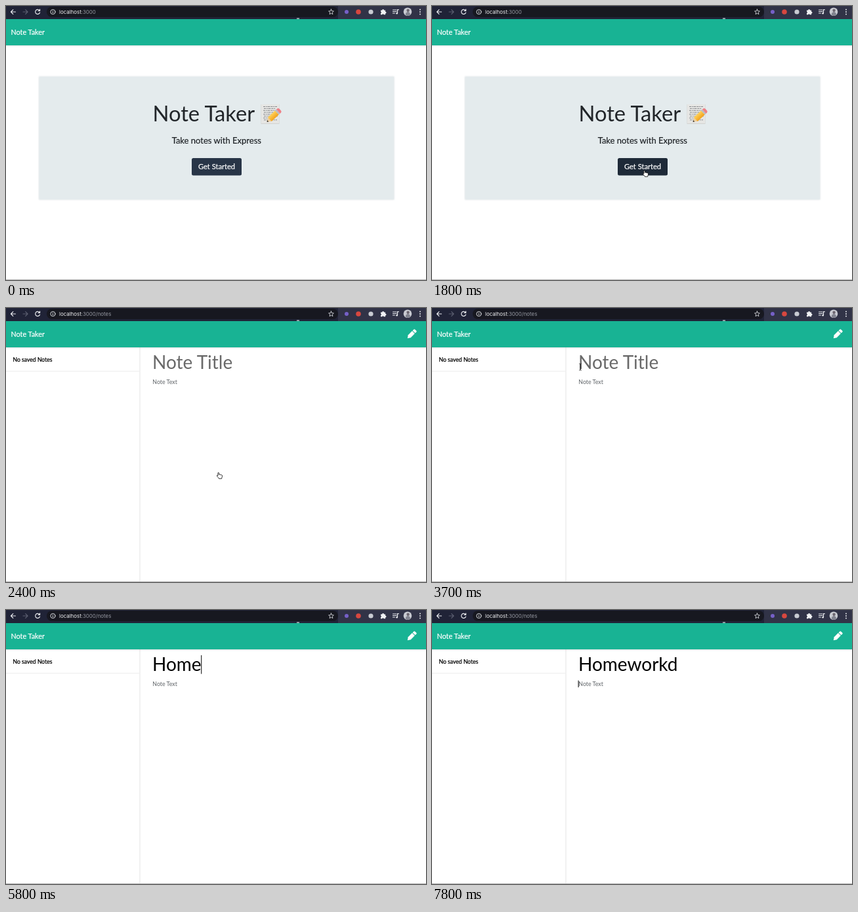
An HTML page that plays this animation: 640x418 px, repeating every 8000 ms.

```html
<!DOCTYPE html>
<html lang="en">
<head>
<meta charset="utf-8">
<title>Note Taker</title>
<style>
html, body { margin: 0; width: 100%; height: 100%; overflow: hidden; background: #fff; }
svg { display: block; width: 640px; height: 418px; }
text { font-family: Lato, sans-serif; white-space: pre; stroke-width: .22px; }
.url { font-family: Inter, Roboto, sans-serif; font-size: 7.9px; }
.line { fill: none; stroke: #e8eaee; stroke-width: 1.2; stroke-linecap: round; stroke-linejoin: round; }
</style>
</head>
<body>
<svg viewBox="0 0 640 418" xmlns="http://www.w3.org/2000/svg">
  <defs>
    <filter id="soft" x="-5%" y="-10%" width="110%" height="125%"><feGaussianBlur stdDeviation="1.2"/></filter>
    <linearGradient id="lead" x2="0" y2="1">
      <stop offset="0" stop-color="#ffd25c"/><stop offset="1" stop-color="#f2a21b"/>
    </linearGradient>
  </defs>
  <rect width="640" height="418" fill="#fff"/>

  <g id="home">
    <rect x="50" y="107.5" width="541.5" height="188" fill="#cfd8db" opacity=".7" filter="url(#soft)"/>
    <rect x="51" y="108" width="540" height="187" fill="#e4ebed"/>
    <text x="223.5" y="176" font-size="32.7" fill="#212529">Note Taker</text>
    <g id="memo" transform="translate(388 149)">
      <rect x=".5" y="1" width="28" height="30" fill="#d2d2d0"/>
      <rect x="1" y="1" width="27" height="29" fill="#e6e6e4"/>
      <path id="scrawl" fill="none" stroke="#85878a" stroke-width="1" stroke-dasharray="3 .9 1.7 .8 4 1"/>
      <g transform="translate(9.5 28) rotate(-43)">
        <path d="M0 0L6.5-4.2V4.2Z" fill="#efcf9c"/>
        <path d="M0 0L2.4-1.5V1.5Z" fill="#333"/>
        <rect x="6" y="-4.2" width="15" height="8.4" fill="url(#lead)"/>
        <rect x="21" y="-4.2" width="2.6" height="8.4" fill="#b9bdc2"/>
        <path d="M23.6-4.2h1.6a2.4 2.4 0 0 1 2.4 2.4v3.6a2.4 2.4 0 0 1-2.4 2.4h-1.6z" fill="#ee7f86"/>
      </g>
    </g>
    <text x="252.7" y="210" font-size="13" fill="#212529" stroke="#212529">Take notes with Express</text>
    <rect id="btn" x="283" y="232" width="76" height="26.5" rx="2.5" stroke-width="3.4" paint-order="stroke"/>
    <text x="293" y="249" font-size="11.1" fill="#fff" stroke="#fff">Get Started</text>
  </g>

  <g id="notes">
    <path d="M0 96.5H204" stroke="#f1f1f1" stroke-width="1.6"/>
    <path d="M204 60V417" stroke="#f0f0f0" stroke-width="1.8"/>
    <text x="10.5" y="82" font-size="8.65" fill="#000" stroke="#000">No saved Notes</text>
    <text id="title" x="223" y="93" font-size="28"/>
    <text x="223.3" y="116" font-size="8.8" fill="#5e6367">Note Text</text>
    <rect id="caret" width="1" fill="#000"/>
  </g>

  <rect y="20" width="640" height="40.5" fill="#8a9a96" opacity=".45" filter="url(#soft)"/>
  <rect y="19" width="640" height="41" fill="#18b394"/>
  <text x="7.5" y="44" font-size="10.8" fill="#fff" stroke="#fff">Note Taker</text>
  <g id="pen" transform="translate(611.5 46.5) rotate(-45)" fill="#fff">
    <path d="M.4 0L4.6-2.8H13.3V2.8H4.6Z"/>
    <path d="M14.3-2.8h2.4a1.3 1.3 0 0 1 1.3 1.3v3a1.3 1.3 0 0 1-1.3 1.3h-2.4z"/>
  </g>

  <g id="chrome">
    <rect width="640" height="20" fill="#202337"/>
    <rect x="506" width="134" height="20" fill="#313347"/>
    <rect x="62" y="1" width="444" height="16" rx="8" fill="#171820"/>
    <rect x="443" y="18.5" width="4" height="1.2" fill="#d9e4e2"/>
    <path class="line" d="M14.5 9H7.5M10.8 5.7L7.5 9l3.3 3.3"/>
    <path class="line" d="M26 9h7M29.7 5.7L33 9l-3.3 3.3" style="stroke:#5d6072"/>
    <path id="reload" class="line" d="M51 6.7A3.5 3.5 0 1 0 51.6 10M51.6 5v2.4h-2.4"/>
    <path id="stop" class="line" d="M45.2 5.7l6.4 6.4M51.6 5.7l-6.4 6.4"/>
    <circle class="line" cx="71.5" cy="9" r="3.6" style="stroke-width:.9"/>
    <path class="line" d="M71.5 8.7v2M71.5 7.1v.1" style="stroke-width:.9"/>
    <text class="url" x="81" y="11.7" fill="#f0f1f3">localhost<tspan id="path" fill="#9699a2"></tspan></text>
    <path class="line" d="M495.5 5l1.1 2.6 2.8.3-2.1 1.9.6 2.8-2.4-1.5-2.4 1.5.6-2.8-2.1-1.9 2.8-.3z" style="stroke-width:.8"/>
    <circle cx="519" cy="9" r="3" fill="#7660c8"/>
    <circle cx="537" cy="9" r="3.8" fill="#d8473f"/>
    <circle cx="556" cy="9" r="3.6" fill="#c9ccd2"/>
    <path d="M571 6.5h2.2a1.4 1.4 0 1 1 2.8 0h2.1v2.2a1.4 1.4 0 1 1 0 2.8v1.8h-2.4a1.3 1.3 0 0 0-2.5 0H571v-2.3a1.3 1.3 0 0 0 0-2.5z" fill="#f1f2f4"/>
    <path class="line" d="M589.5 6h5.5M589.5 8.5h5.5M589.5 11h3M596.5 11V5.7h1.8"/>
    <circle cx="595.6" cy="11.3" r="1.3" fill="#e8eaee"/>
    <circle cx="612" cy="8.7" r="6.3" fill="#c9cbd2"/>
    <circle cx="612.6" cy="6.7" r="2.2" fill="#6c6670"/>
    <path d="M608.7 13.6c0-6 7.4-6 7.4 0a6.3 6.3 0 0 1-7.4 0z" fill="#81838f"/>
    <g fill="#e8eaee"><circle cx="631" cy="5.5" r="1"/><circle cx="631" cy="9" r="1"/><circle cx="631" cy="12.5" r="1"/></g>
  </g>
  <rect y="417" width="640" height="1" fill="#b5b5b5"/>

  <g id="pointer">
    <path id="arrow" d="M0 0V8.6L2 6.8 3.4 9.8 4.9 9.1 3.5 6.2H6.2Z" fill="#000" stroke="#fff" stroke-width=".7"/>
    <path id="hand" d="M-2.2 1.1C-2.2-.3-.4-.3-.4 1.1V3.3C0 2.5 1.4 2.6 1.5 3.5 2 2.9 3.1 3.1 3.2 4 3.9 3.6 4.6 4 4.5 4.9 4.5 7 3.9 7.4 3.6 9.3H-.6C-1.1 7.7-2.6 6.9-3.6 5.2-3.9 4.4-2.9 4.1-2.2 4.9Z" fill="#fff" stroke="#000" stroke-width=".8" stroke-linejoin="round"/>
    <path id="beam" d="M-1.8-5.2Q0-5.2 0-4V4Q0 5.2-1.8 5.2M1.8-5.2Q0-5.2 0-4V4Q0 5.2 1.8 5.2" fill="none" stroke="#222" stroke-width=".8"/>
  </g>
</svg>
<script>
const LOOP = 8000, PAGE = 2400, CLICK = 3900, TAB = 6700;
const WORD = 'Homeworkd';
const keys = [5400, 5600, 5700, 5800, 6000, 6000, 6200, 6300, 6400];
// pointer stops: time, x, y
const route = [
  [400, 540, 424], [500, 495, 403], [700, 402, 360], [800, 373, 342], [900, 350, 317],
  [1000, 338, 294], [1100, 328, 272], [1200, 325, 266], [1400, 325, 259], [1600, 325, 251],
  [2500, 325, 251], [2650, 324, 238], [2800, 321, 205], [3000, 317, 138],
  [3200, 262, 100], [3400, 213, 91], [3500, 226, 90]
];

const $ = id => document.getElementById(id);
const show = (id, on) => $(id).setAttribute('display', on ? 'inline' : 'none');
const set = (id, attrs) => { for (const k in attrs) $(id).setAttribute(k, attrs[k]); };
const put = (id, s) => { if ($(id).textContent !== s) $(id).textContent = s; };

set('scrawl', { d: Array.from({ length: 8 }, (_, i) => `M${4 + i % 2} ${4.5 + i * 2.9}h${21 - i * 3 % 5}`).join('') });

function along(t) {
  const i = route.findIndex(p => p[0] > t);
  if (i < 0) return route[route.length - 1].slice(1);
  if (i === 0) return route[0].slice(1);
  const [t0, x0, y0] = route[i - 1], [t1, x1, y1] = route[i];
  const k = (t - t0) / (t1 - t0);
  return [x0 + (x1 - x0) * k, y0 + (y1 - y0) * k];
}

function drawPointer(t) {
  const [x, y] = along(t);
  const kind = t < 1450 ? 'arrow' : t < 2600 ? 'hand' : 'beam';
  set('pointer', { transform: `translate(${x} ${y})` });
  show('pointer', t >= 400 && t < 4000);
  for (const k of ['arrow', 'hand', 'beam']) show(k, k === kind);
}

function drawCaret(t) {
  const last = keys.filter(k => k <= t).pop() || CLICK;
  const from = t >= TAB ? TAB : last;
  const on = t >= CLICK && Math.floor((t - from) / 500) % 2 === 0;
  const typed = t >= keys[0] ? $('title').getComputedTextLength() : 0;
  show('caret', on);
  set('caret', t >= TAB
    ? { x: 222.6, y: 107.5, height: 10.5 }
    : { x: 222.6 + typed, y: 69, height: 28.5 });
}

function draw(t) {
  const notes = t >= PAGE, pressed = t >= 1900, loading = t >= 2000 && !notes;
  show('home', !notes);
  show('notes', notes);
  show('pen', notes);
  show('reload', !loading);
  show('stop', loading);
  put('path', ':3000' + (loading || notes ? '/notes' : ''));
  set('btn', {
    fill: pressed ? '#15202c' : t >= 1450 ? '#1e2a38' : '#283547',
    stroke: pressed ? '#86909a' : 'none'
  });
  const n = keys.filter(k => k <= t).length;
  put('title', n ? WORD.slice(0, n) : 'Note Title');
  set('title', { fill: n ? '#000' : '#696969' });
  if (notes) drawCaret(t);
  drawPointer(t);
}

let start;
function tick(now) {
  if (start === undefined) start = now;
  draw((now - start) % LOOP);
  requestAnimationFrame(tick);
}
draw(0);
requestAnimationFrame(tick);
</script>
</body>
</html>
```
